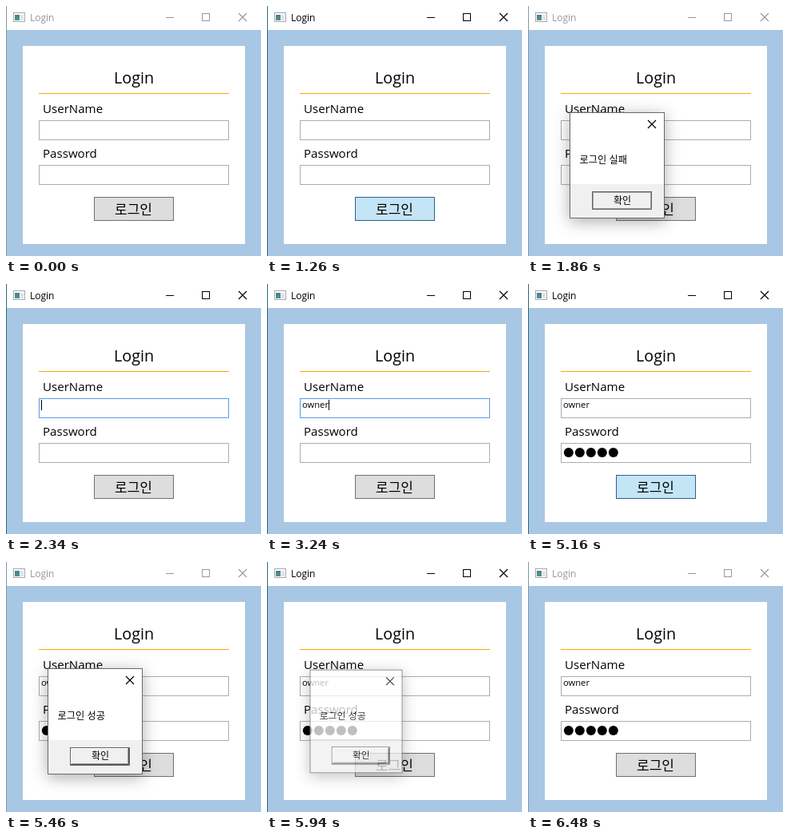
Animation of 319 by 313 pixels, one loop 6540 ms. Source, as an HTML page:

```html
<!DOCTYPE html>
<html lang="ko">
<head>
<meta charset="utf-8">
<title>Login</title>
<style>
html, body { margin: 0; width: 100%; height: 100%; overflow: hidden; background: #fff; }
svg { display: block; width: 319px; height: 313px; }
text { font-family: "Open Sans", "Noto Sans", sans-serif; white-space: pre; }
.ko { font-family: "Noto Sans CJK KR", "Noto Sans CJK", "Noto Sans KR", sans-serif; }
.mid { text-anchor: middle; }
.line { fill: none; stroke-width: 1; }
.cross { stroke-width: 1.2; }
</style>
</head>
<body>
<svg viewBox="0 0 319 313" xmlns="http://www.w3.org/2000/svg">
  <defs>
    <filter id="shadow" x="-50%" y="-50%" width="200%" height="200%">
      <feDropShadow dx="0" dy="4" stdDeviation="10" flood-color="#000" flood-opacity=".32"/>
    </filter>
    <linearGradient id="pane" x1="0" y1="0" x2="0" y2="1">
      <stop offset="0" stop-color="#4a78a6"/>
      <stop offset="1" stop-color="#4f9a76"/>
    </linearGradient>
  </defs>

  <rect width="319" height="313" fill="#a8c7e4"/>
  <rect width="319" height="30" fill="#fff"/>
  <rect id="edge" width="1" height="313"/>

  <g>
    <rect x="9.5" y="8.5" width="14" height="11" fill="#fff" stroke="#a3a8ac"/>
    <rect x="11" y="11" width="6" height="7" fill="url(#pane)"/>
    <path class="line" d="M18 12.500H22M18 14.500H22M18 16.500H22" stroke="#c3cac8"/>
  </g>
  <text id="caption" x="30" y="19" font-size="12">Login</text>
  <g id="controls" class="line">
    <path d="M200 14.500H210"/>
    <rect x="245.5" y="9.5" width="9" height="9"/>
    <path class="cross" d="M291 9L301 19M301 9L291 19"/>
  </g>

  <rect x="21" y="50" width="278" height="248" fill="#fff"/>
  <text class="mid" x="160" y="97" font-size="19.700">Login</text>
  <path class="line" d="M41 109.500H279" stroke="#ffa500"/>
  <text x="46" y="134" font-size="15.100">UserName</text>
  <rect id="userBox" class="line" x="41.500" y="143.500" width="237" height="24"/>
  <text id="user" x="44" y="155" font-size="11.200"></text>
  <text x="46" y="190" font-size="15.100">Password</text>
  <rect id="passBox" class="line" x="41.500" y="199.500" width="237" height="24"/>
  <g id="dots"></g>
  <rect id="caret" width="1"/>
  <rect id="login" x="110.500" y="239.500" width="99" height="29"/>
  <text class="ko mid" x="159.500" y="260.500" font-size="17">로그인</text>

  <g id="dialog">
    <rect x="52" y="133" width="119" height="133" fill="#666a6e" filter="url(#shadow)"/>
    <rect x="53" y="134" width="117" height="89" fill="#fff"/>
    <rect x="53" y="223" width="117" height="42" fill="#f0f0f0"/>
    <path class="line cross" d="M150 143L160 153M160 143L150 153" stroke="#000"/>
    <text id="message" class="ko" x="64.500" y="197" font-size="12.200"></text>
    <rect x="80.500" y="232.500" width="74" height="22" fill="#f0f0f0" stroke="#646464"/>
    <path id="lit" class="line" d="M81.500 253V233.500H153" stroke="#fff"/>
    <path id="inner" class="line" d="M82 252.500H152.500V234" stroke="#a0a0a0"/>
    <path id="dark" class="line" d="M81 253.500H153.500V233"/>
    <text id="ok" class="ko mid" x="118" font-size="12">확인</text>
  </g>
</svg>

<script>
const LOOP = 6540, TICK = 60, NAME = "owner";
const $ = id => document.getElementById(id);
const set = (id, attrs) => {
  for (const key in attrs) $(id).setAttribute(key, attrs[key]);
};
const within = (t, from, to) => t >= from && t < to;
const count = (t, times) => times.filter(at => t >= at).length;
const ramp = (t, from, to) => Math.min(1, Math.max(0, (t - from) / (to - from)));

const userKeys = [2760, 2880, 3000, 3120, 3240];
const passKeys = [3900, 4020, 4140, 4320, 4440];
const BORDER = { idle: "#abadb3", hover: "#7eb4ea", focus: "#569de5" };
const BUTTON = {
  idle: ["#dddddd", "#707070"],
  hover: ["#bee6fd", "#3c7fb1"],
  down: ["#c4e5f6", "#2c628b"]
};
const popups = [
  { text: "로그인 실패", open: 1380, shown: 1620, press: 1860, close: 1920, gone: 2100 },
  { text: "로그인 성공", open: 5220, shown: 5460, press: 5820, close: 5880, gone: 6120 }
];

for (let i = 0; i < NAME.length; i++) {
  const dot = document.createElementNS("http://www.w3.org/2000/svg", "circle");
  dot.setAttribute("cx", 50.8 + i * 14);
  dot.setAttribute("cy", 211);
  dot.setAttribute("r", 6);
  $("dots").append(dot);
}

function drawWindow(t) {
  const active = within(t, 1200, 1380) || within(t, 1920, 5220) || within(t, 5940, 6480);
  const ink = active ? "#000" : "#999";
  set("edge", { fill: active ? "#2b6a7c" : "#8499a8" });
  set("caption", { fill: ink });
  set("controls", { stroke: ink });
}

function drawForm(t) {
  const userFocus = within(t, 2340, 3480), passFocus = within(t, 3480, 5160);
  const userHover = within(t, 240, 480) || within(t, 3480, 4920);
  set("userBox", { stroke: userFocus ? BORDER.focus : userHover ? BORDER.hover : BORDER.idle });
  set("passBox", { stroke: passFocus ? BORDER.focus : BORDER.idle });

  $("user").textContent = NAME.slice(0, count(t, userKeys));
  const typed = count(t, passKeys);
  [...$("dots").children].forEach((dot, i) => dot.setAttribute("opacity", i < typed ? 1 : 0));

  const userWidth = $("user").textContent ? $("user").getComputedTextLength() : 0;
  const lit = userFocus || within(t, 3480, 4860);
  set("caret", {
    x: userFocus ? Math.round(44 + userWidth) : 44 + typed * 14,
    y: userFocus ? 145 : 201,
    height: userFocus ? 13 : 18,
    opacity: lit ? 1 : 0
  });

  const down = within(t, 1200, 1380) || within(t, 5160, 5220);
  const hover = within(t, 1140, 1200) || within(t, 5040, 5160);
  const [fill, stroke] = BUTTON[down ? "down" : hover ? "hover" : "idle"];
  set("login", { fill, stroke });
}

function drawDialog(t) {
  const p = popups.find(p => within(t, p.open, p.gone));
  if (!p) return set("dialog", { visibility: "hidden" });
  const enter = 1 - (1 - ramp(t, p.open, p.shown)) ** 2;
  const leave = ramp(t, p.close, p.gone);
  const scale = (0.9 + 0.1 * enter) * (1 - 0.1 * leave);
  set("dialog", {
    visibility: "visible",
    opacity: enter * (1 - leave),
    transform: `translate(111.5 199.5) scale(${scale}) translate(-111.5 -199.5)`
  });
  const pressed = within(t, p.press, p.close);
  $("message").textContent = p.text;
  set("ok", { y: pressed ? 248 : 247 });
  set("lit", { stroke: pressed ? "#a0a0a0" : "#fff" });
  set("inner", { opacity: pressed ? 0 : 1 });
  set("dark", { stroke: pressed ? "#a0a0a0" : "#505050" });
}

function draw() {
  const t = Math.floor((performance.now() % LOOP) / TICK) * TICK;
  drawWindow(t);
  drawForm(t);
  drawDialog(t);
  requestAnimationFrame(draw);
}
draw();
</script>
</body>
</html>
```
